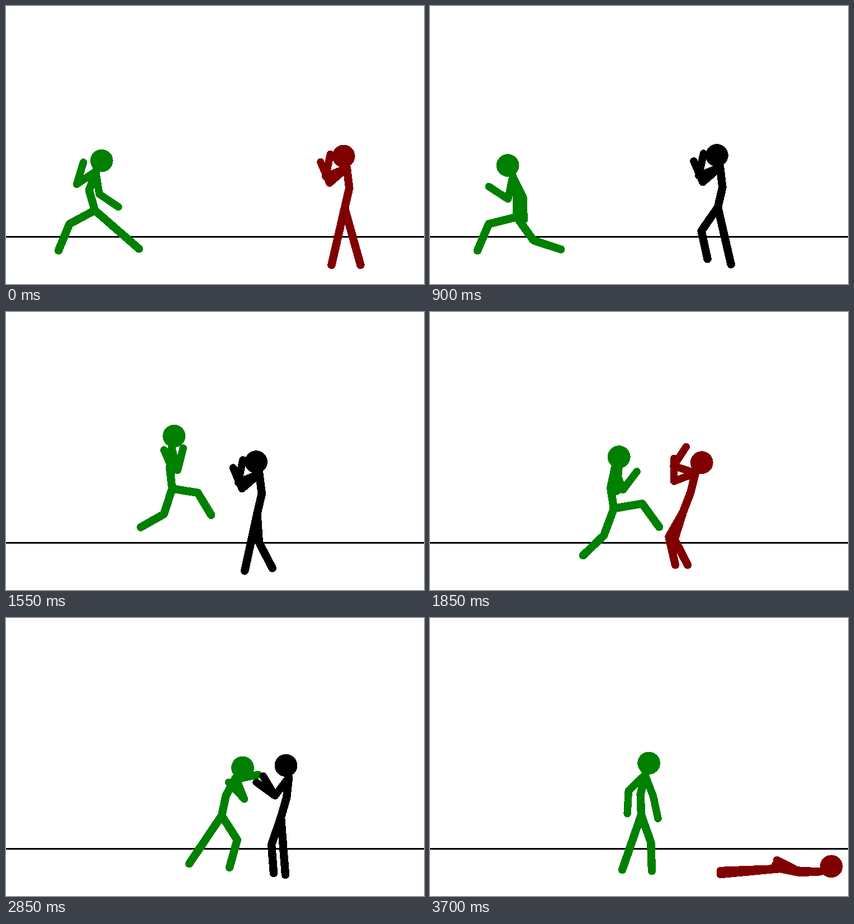
Recreate the animation shown at these times as an HTML page. Size 748 px wide and 498 px high, loop 4450 ms.

```html
<!DOCTYPE html>
<html lang="en">
<head>
<meta charset="utf-8">
<title>Stick fight</title>
<style>
  html, body { margin: 0; width: 100%; height: 100%; overflow: hidden; background: #fff; }
  svg { display: block; shape-rendering: crispEdges; }
  polyline { fill: none; stroke-width: 14.5; stroke-linecap: round; stroke-linejoin: round; }
  .arms { stroke-width: 13.5; }
</style>
</head>
<body>
<svg id="stage" width="748" height="498" viewBox="0 0 748 498">
  <rect y="412" width="748" height="3"/>
</svg>
<script>
const LOOP = 4450, STEP = 50, LAST = 3700, HIT = 1650;
const SPINE = [37, 36, 22], ARM = 41, LEG = 51.5;
const RED = '#800000', BLACK = '#000', GREEN = '#008000';

const lerp = (a, b, k) => a + (b - a) * k;
const clamp = (v, lo, hi) => Math.min(hi, Math.max(lo, v));
const easeOut = k => 1 - (1 - k) ** 2;

// Bone angles in degrees; hip and feet are places, knees follow from them
const pose = (hip, spine, arms, feet) => ({ hip, spine, arms, feet });
const move = (p, dx, dy = 0) => {
  const by = (v, i) => v + (i % 2 ? dy : dx);
  return { ...p, hip: p.hip.map(by), feet: p.feet.map(by) };
};

const ready = pose([159, 366], [-106, -71, -61], [146, -73, 81, 34], [94, 438, 238, 435]);
const crouch = pose([159, 377], [-90, -101, -114], [102, 213, 63, 88], [89, 437, 238, 435]);
const takeoff = pose([202, 342], [-88, -104, -107], [94, 215, 94, 164], [143, 366, 239, 432]);
const landing = pose([329, 352], [-99, -78, -70], [69, -53, 85, -85], [274, 436, 410, 385]);
const stance = pose([350, 363], [-95, -74, -70], [90, -45, 176, -5], [288, 445, 398, 439]);
const lunge = pose([386, 354], [-78, -61, -56], [-8, 168, 68, 227], [328, 440, 400, 447]);
const punch = { ...lunge, arms: [-5, -5, 68, 227] };
const rest = pose([378, 353], [-92, -77, -72], [136, 93, 69, 78], [344, 451, 397, 453]);

const recoil = pose([453, 358], [-69, -76, -59], [159, -90, 198, -57], [461, 453, 439, 453]);
const block = pose([480, 361], [-70, -90, -98], [150, -90, 150, -90], [490, 452, 463, 456]);
const brace = pose([492, 357], [-74, -84, -103], [127, -121, 127, 216], [500, 460, 479, 457]);
const down = pose([626, 449], [11, -3, -25], [183, 207, 181, 197], [520, 453, 520, 459]);

// Steady walk to the left, one step every 500 ms
function walk(t) {
  const a = Math.PI * t / 500, x = 606 - t / 9.9, y = 360 + 2 * Math.cos(2 * a);
  const foot = dir => [
    x + 2.5 - dir * 26 * Math.cos(a),
    y + 102 - 16 * Math.max(0, -dir * Math.sin(a))
  ];
  return pose([x, y], [-77, -97, -105], [139, -113, 158, -78], [...foot(1), ...foot(-1)]);
}

const attacks = [
  [0, ready], [500, crouch], [900, move(crouch, -4, 1)], [1250, takeoff], [1850, landing],
  [2250, stance], [2450, move(punch, -28, 6)], [2700, move(stance, 20, -3)],
  [2850, lunge], [2950, move(punch, 6)], [3350, rest]
];
const defences = [
  [HIT, walk(HIT)], [1850, recoil], [1950, move(recoil, 14)], [2250, block],
  [2500, move(recoil, 30)], [2850, brace], [2950, brace], [3650, down]
];
const colourSwaps = [100, 1700, 2650, 2950];

function blend(p, q, k) {
  const places = key => p[key].map((v, i) => lerp(v, q[key][i], k));
  const angles = key => p[key].map((v, i) => {
    const turn = ((q[key][i] - v) % 360 + 540) % 360 - 180;
    return v + turn * k;
  });
  return pose(places('hip'), angles('spine'), angles('arms'), places('feet'));
}

function poseAt(keys, t, ease = k => k) {
  const n = keys.findIndex(([at]) => at > t);
  if (n < 0) return keys[keys.length - 1][1];
  const [t0, p] = keys[n - 1], [t1, q] = keys[n];
  return blend(p, q, ease((t - t0) / (t1 - t0)));
}

function attacker(t) {
  const leap = (t - 1250) / 600;
  if (leap <= 0 || leap >= 1) return poseAt(attacks, t);
  return move(poseAt(attacks, t, easeOut), 0, -132 * leap * (1 - leap));
}

const defender = t => t < HIT ? walk(t) : poseAt(defences, t);

function bone([x, y], deg, len) {
  const a = deg * Math.PI / 180;
  return [x + len * Math.cos(a), y + len * Math.sin(a)];
}

// Two equal bones; bend is 1 for a figure facing left, -1 for right
function knee([x, y], [fx, fy], bend) {
  const dx = fx - x, dy = fy - y, d = Math.hypot(dx, dy);
  const out = bend * Math.sqrt(Math.max(0, LEG ** 2 - d * d / 4)) / d;
  return [x + dx / 2 - dy * out, y + dy / 2 + dx * out];
}

const stage = document.getElementById('stage');

function add(parent, tag, attrs = {}) {
  const el = document.createElementNS('http://www.w3.org/2000/svg', tag);
  for (const name in attrs) el.setAttribute(name, attrs[name]);
  return parent.appendChild(el);
}

function figure() {
  const g = add(stage, 'g');
  const [legs, spine, arms] = ['legs', 'spine', 'arms'].map(name => add(g, 'polyline', { class: name }));
  const head = add(g, 'circle', { r: 20.4 });
  return (p, colour, bend) => {
    const back = [p.hip];
    p.spine.forEach((deg, i) => back.push(bone(back[i], deg, SPINE[i])));
    const [, , neck, top] = back;
    const [a, b] = [0, 2].map(i => {
      const elbow = bone(neck, p.arms[i], ARM);
      return [elbow, bone(elbow, p.arms[i + 1], ARM)];
    });
    const footA = p.feet.slice(0, 2), footB = p.feet.slice(2);
    legs.setAttribute('points', [footA, knee(p.hip, footA, bend), p.hip, knee(p.hip, footB, bend), footB].join(' '));
    spine.setAttribute('points', back.join(' '));
    arms.setAttribute('points', [a[1], a[0], neck, ...b].join(' '));
    head.setAttribute('cx', top[0]);
    head.setAttribute('cy', top[1]);
    g.setAttribute('fill', colour);
    g.setAttribute('stroke', colour);
    head.setAttribute('stroke', 'none');
  };
}

const drawAttacker = figure(), drawDefender = figure();

function draw(t) {
  const swaps = colourSwaps.filter(at => at <= t).length;
  drawAttacker(attacker(t), GREEN, clamp((1450 - t) / 150, -1, 1));
  drawDefender(defender(t), swaps % 2 ? BLACK : RED, 1);
}

const start = performance.now();
function tick() {
  const t = (performance.now() - start) % LOOP;
  draw(Math.min(LAST, Math.floor(t / STEP) * STEP));
  requestAnimationFrame(tick);
}
tick();
</script>
</body>
</html>
```
